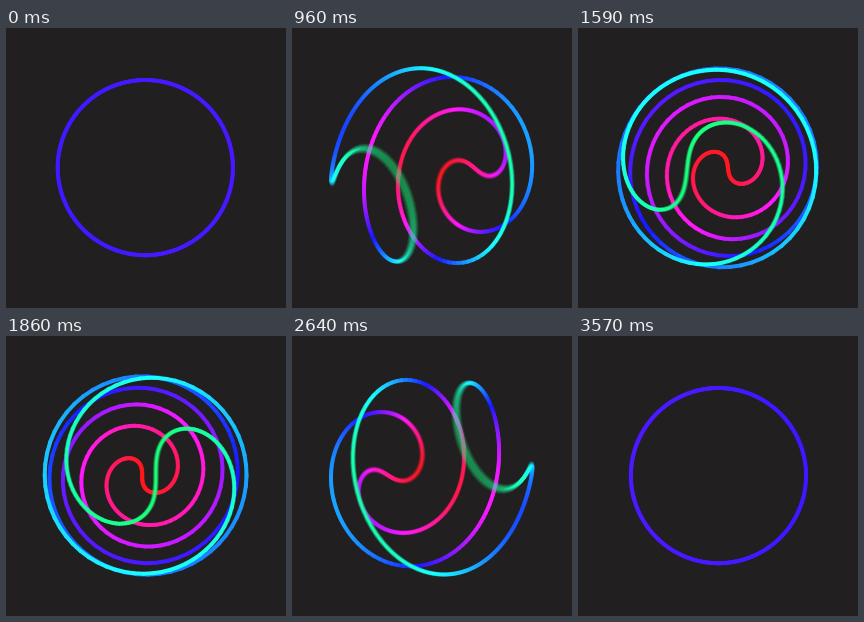
An HTML page with a canvas for the animation above (3600 ms loop, 280x280 px).

```html
<!DOCTYPE html>
<html lang="en">
<head>
<meta charset="utf-8">
<title>Twisting ring</title>
<style>
  html, body { margin: 0; width: 100%; height: 100%; overflow: hidden; background: #221f20; }
  canvas { display: block; }
</style>
</head>
<body>
<canvas id="stage" width="280" height="280"></canvas>
<script>
const SIZE = 280, CENTER = 139.6, RADIUS = 87.6, LOOP = 3600, STEP = 30;
const SEGMENTS = 480, SAMPLES = 8, SHUTTER = 0.55;
const MAX_TWIST = 3 * Math.PI;

const screen = document.getElementById('stage').getContext('2d');
const layer = document.createElement('canvas');
layer.width = layer.height = SIZE;
const ctx = layer.getContext('2d');
ctx.lineWidth = 4;
ctx.lineCap = 'round';

const smootherstep = u => u * u * u * (10 - 15 * u + 6 * u * u);

// A great circle twisted about an axis in its plane, the axis itself turning about y.
function ringPoint(theta, twist, tilt) {
  const a = Math.cos(theta), s = Math.sin(theta);
  const p = s * Math.cos(twist * a), q = s * Math.sin(twist * a);
  const x = q * Math.sin(tilt) - a * Math.cos(tilt);
  const z = a * Math.sin(tilt) + q * Math.cos(tilt);
  const scale = RADIUS * 2 / (2 - z);
  return { x: CENTER + x * scale, y: CENTER + p * scale, z };
}

function drawRing(time) {
  const t = time / LOOP;
  const twist = MAX_TWIST * smootherstep(1 - Math.abs(1 - 2 * t));
  const points = Array.from({ length: SEGMENTS }, (_, i) =>
    ringPoint(i / SEGMENTS * 2 * Math.PI, twist, Math.PI * t));
  const segments = points.map((from, i) => {
    const to = points[(i + 1) % SEGMENTS];
    return { from, to, z: (from.z + to.z) / 2 };
  }).sort((m, n) => m.z - n.z);

  ctx.fillStyle = '#221f20';
  ctx.fillRect(0, 0, SIZE, SIZE);
  for (const { from, to, z } of segments) {
    ctx.strokeStyle = `hsl(${252 - 108 * z}, 100%, 55%)`;
    ctx.beginPath();
    ctx.moveTo(from.x, from.y);
    ctx.lineTo(to.x, to.y);
    ctx.stroke();
  }
}

// Motion blur: running average of several moments within the shutter time.
function render(time) {
  for (let i = 0; i < SAMPLES; i++) {
    drawRing(time + STEP * SHUTTER * i / SAMPLES);
    screen.globalAlpha = 1 / (i + 1);
    screen.drawImage(layer, 0, 0);
  }
}

let shown = -1;
function tick() {
  const time = Math.floor(performance.now() % LOOP / STEP) * STEP;
  if (time !== shown) render(shown = time);
  requestAnimationFrame(tick);
}
tick();
</script>
</body>
</html>
```
